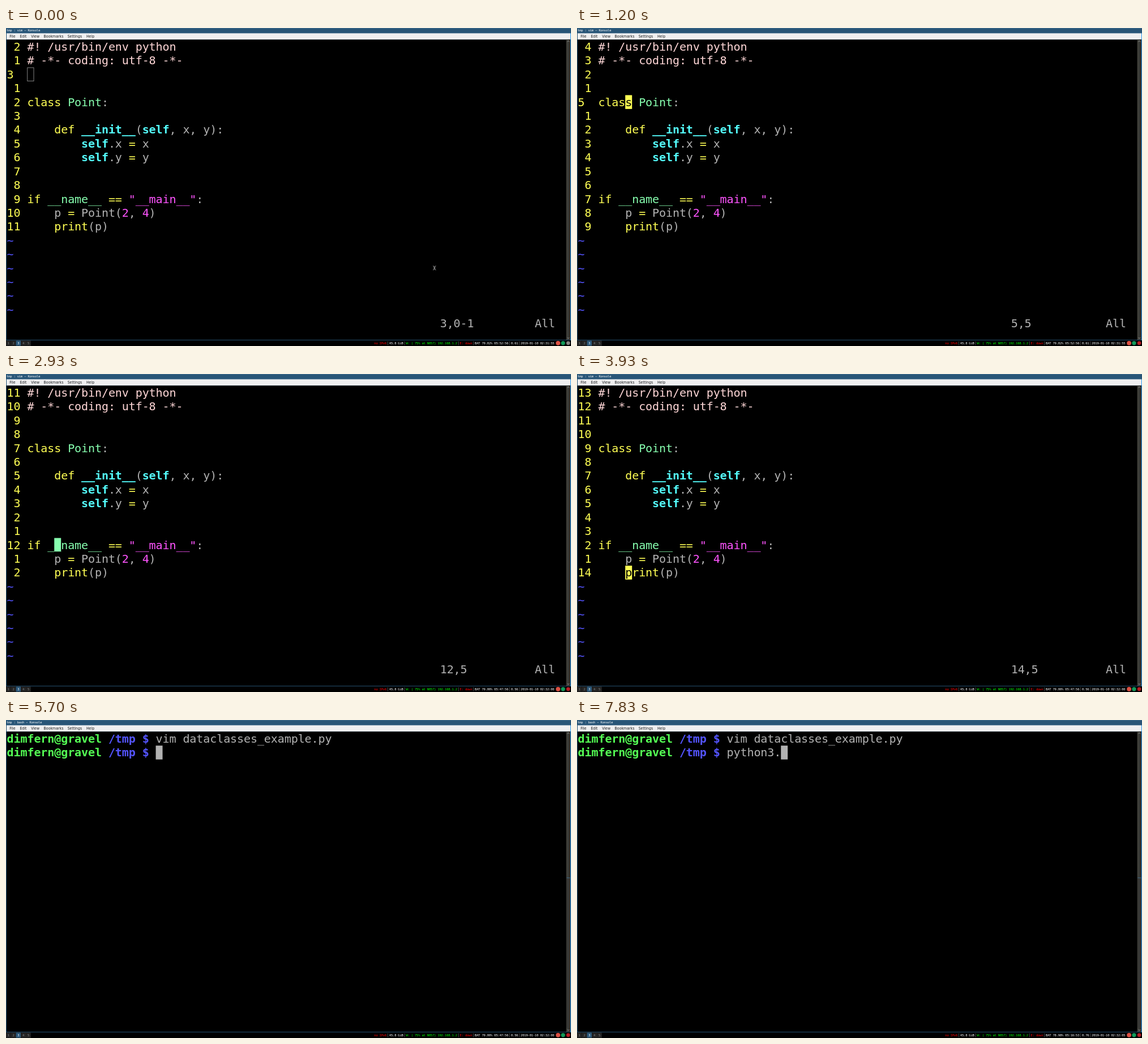
Animation of 998x561 px, one loop 8 s. Source, as an HTML page with a canvas:

```html
<!DOCTYPE html>
<html lang="en">
<head>
<meta charset="utf-8">
<title>Terminal session</title>
<style>
  html, body { margin: 0; width: 100%; height: 100%; overflow: hidden; background: #000; }
  canvas { display: block; }
</style>
</head>
<body>
<canvas id="stage" width="998" height="561"></canvas>
<script>
const ctx = document.getElementById('stage').getContext('2d');
const LOOP = 8000;

// The desktop is laid out at 1920 x 1080 and scaled down to the stage.
const DESK_W = 1920, DESK_H = 1080, BAR_Y = 1061;
const CELL_W = 23, CELL_H = 47, TERM_X = 3, TERM_Y = 40, BASELINE = 37;
const MONO = '"DejaVu Sans Mono", monospace';
const COLOR = {
  plain: '#b2b2b2', comment: '#ffd7d7', string: '#ff54ff', number: '#ff54ff',
  member: '#54ffff', type: '#87ffaf', keyword: '#ffff54', blue: '#5454ff', green: '#54ff54'
};

const SOURCE = `#! /usr/bin/env python
# -*- coding: utf-8 -*-


class Point:

    def __init__(self, x, y):
        self.x = x
        self.y = y


if __name__ == "__main__":
    p = Point(2, 4)
    print(p)`.split('\n');
const TOKENS = /(?<comment>#.*)|(?<string>"[^"]*")|(?<member>__init__|self)|(?<type>__name__|(?<=class )Point)|(?<keyword>\b(?:class|def|if|print)\b|=+)|(?<number>\d)/g;

// Per line: the token kind of every character.
const KINDS = SOURCE.map(line => {
  const kinds = Array(line.length).fill('plain');
  for (const match of line.matchAll(TOKENS)) {
    const kind = Object.keys(match.groups).find(k => match.groups[k]);
    kinds.fill(kind, match.index, match.index + match[0].length);
  }
  return kinds;
});

// Cursor in the editor: [start time, line, column]
const MOVES = [
  [0, 3, 0], [400, 4, 0], [550, 5, 0], [650, 5, 1], [750, 5, 2], [850, 5, 3], [950, 5, 4],
  [1500, 6, 4], [1750, 7, 4], [1980, 8, 4], [2230, 9, 4], [2430, 10, 4], [2630, 11, 4],
  [2830, 12, 4], [3060, 13, 4], [3270, 14, 4]
];
const STATUS = [
  [0, 'BAT 79.02% 05:52:56', '0.61', '2019-01-10 02:31:55'],
  [1550, 'BAT 79.00% 05:47:56', '0.56', '2019-01-10 02:32:00'],
  [6550, 'BAT 78.98% 05:16:53', '0.76', '2019-01-10 02:32:05']
];
const FOCUS_AT = 200, COLON_AT = 4300, Q_AT = 4500, QUIT_AT = 5370;
const TYPE_FROM = 7070, TYPE_TO = 7830, COMMAND = 'python3.';

const latest = (steps, t) => steps.findLast(step => step[0] <= t);

function rect(x, y, w, h, color) {
  ctx.fillStyle = color;
  ctx.fillRect(x, y, w, h);
}

function circle(x, y, r, color) {
  ctx.fillStyle = color;
  ctx.beginPath();
  ctx.arc(x, y, r, 0, 2 * Math.PI);
  ctx.fill();
}

function spaced(text, x, y, pitch) {
  [...text].forEach((char, i) => ctx.fillText(char, x + i * pitch, y));
}

function small(text, x, y, color) {
  ctx.font = '10.67px ' + MONO;
  ctx.fillStyle = color;
  spaced(text, x, y, 6);
}

function put(text, row, col, color = COLOR.plain, bold = false) {
  ctx.font = (bold ? 'bold ' : '') + '38.67px ' + MONO;
  ctx.fillStyle = color;
  spaced(text, TERM_X + col * CELL_W, TERM_Y + row * CELL_H + BASELINE, CELL_W);
}

function block(row, col, color = COLOR.plain, focused = true) {
  const x = TERM_X + col * CELL_W, y = TERM_Y + row * CELL_H;
  if (focused) return rect(x, y, CELL_W, CELL_H, color);
  ctx.strokeStyle = color;
  ctx.lineWidth = 1.4;
  ctx.strokeRect(x + .7, y + .7, CELL_W - 1.4, CELL_H - 1.4);
}

function drawEditor(t) {
  const [, line, col] = latest(MOVES, t);
  SOURCE.forEach((text, row) => {
    const distance = Math.abs(row + 1 - line);
    put(distance ? String(distance).padStart(2) : String(line), row, 0, COLOR.keyword);
    [...text].forEach((char, i) => {
      const kind = KINDS[row][i];
      put(char, row, i + 3, COLOR[kind], kind === 'member');
    });
  });
  for (let row = SOURCE.length; row < 20; row++) put('~', row, 0, COLOR.blue);

  const empty = !SOURCE[line - 1];
  put(`${line},${empty ? '0-1' : col + 1}`, 20, 64);
  put('All', 20, 78);

  if (t >= COLON_AT) {
    const typed = t < Q_AT ? ':' : ':q';
    put(typed, 20, 0);
    block(20, typed.length);
    return;
  }
  const at = empty ? 0 : col;
  const kind = KINDS[line - 1][at] || 'plain';
  const focused = t >= FOCUS_AT;
  block(line - 1, at + 3, COLOR[kind], focused);
  if (focused) put(SOURCE[line - 1][at] || ' ', line - 1, at + 3, '#000', kind === 'member');
}

function drawShell(t) {
  for (const row of [0, 1]) {
    put('dimfern@gravel', row, 0, COLOR.green, true);
    put('/tmp $', row, 15, COLOR.blue, true);
  }
  put('vim dataclasses_example.py', 0, 22);
  const step = (TYPE_TO - TYPE_FROM) / (COMMAND.length - 1);
  const count = t < TYPE_FROM ? 0 : Math.min(COMMAND.length, 1 + Math.floor((t - TYPE_FROM) / step + 1e-6));
  put(COMMAND.slice(0, count), 1, 22);
  block(1, 22 + count);
}

function arrow(y, dir) {
  ctx.strokeStyle = '#a0a0a0';
  ctx.lineWidth = 1.5;
  ctx.beginPath();
  ctx.moveTo(1907.5, y + 2 * dir);
  ctx.lineTo(1911, y - 2 * dir);
  ctx.lineTo(1914.5, y + 2 * dir);
  ctx.stroke();
}

function drawScrollbar(inShell) {
  const groove = ctx.createLinearGradient(1904, 0, 1918, 0);
  groove.addColorStop(0, '#45453f');
  groove.addColorStop(1, '#2c2c2a');
  rect(1904, 39, 14, BAR_Y - 41, groove);
  if (inShell) {
    rect(1905, 535, 12, 510, '#383835');
    rect(1905, 535, 12, 2, '#3f6580');
  }
  arrow(45, 1);
  arrow(1053, -1);
}

function drawWindow(inShell) {
  rect(0, 0, DESK_W, BAR_Y, '#285577');
  rect(0, 0, DESK_W, 1, '#4c7899');
  rect(0, 17, DESK_W, 1, '#4c7899');
  rect(1918, 18, 2, BAR_Y - 18, '#2e9ef4');
  rect(2, 39, 1916, BAR_Y - 41, '#000');
  small(`tmp : ${inShell ? 'bash' : 'vim'} — Konsole`, 2, 12, '#fff');

  rect(2, 18, 1916, 21, '#efeff0');
  ctx.font = '12px "DejaVu Sans", sans-serif';
  ctx.fillStyle = '#1c1e20';
  [['File', 12], ['Edit', 47], ['View', 85], ['Bookmarks', 128], ['Settings', 209], ['Help', 273]]
    .forEach(([label, x]) => ctx.fillText(label, x, 32));
  drawScrollbar(inShell);
}

function drawBar(t) {
  rect(0, BAR_Y, DESK_W, DESK_H - BAR_Y, '#000');
  for (let i = 0; i < 5; i++) {
    const active = i === 2;
    rect(i * 17, BAR_Y + 1, 16, 17, active ? '#4c7899' : '#333');
    rect(i * 17 + 1, BAR_Y + 2, 14, 15, active ? '#285577' : '#222');
    small(String(i + 1), i * 17 + 5, 1074, active ? '#fff' : '#888');
  }

  const [, battery, load, clock] = latest(STATUS, t);
  let x = 1251;
  [
    ['no IPv6', '#f00'], ['45.8 GiB', '#fff'], ['W: ( 75% at N057) 192.168.1.2', '#0f0'],
    ['E: down', '#f00'], [battery, '#fff'], [load, '#fff'], [clock, '#fff']
  ].forEach(([text, color], i) => {
    if (i) rect(x - 5, BAR_Y + 3, 1, 13, '#888');
    small(text, x, 1074, color);
    x += text.length * 6 + 9;
  });

  circle(1876, 1070, 7.5, '#dd5144');
  circle(1893, 1070, 7, '#119a5a');
  circle(1910.5, 1070, 6.5, t < FOCUS_AT ? '#858585' : '#b81c24');
}

function drawPointer(x, y) {
  ctx.strokeStyle = '#c8c8c8';
  ctx.lineWidth = 1.6;
  ctx.beginPath();
  for (const side of [-1, 1]) {
    ctx.moveTo(x + side * 5, y - 7);
    ctx.lineTo(x + side * 1.5, y - 5);
    ctx.lineTo(x + side * 1.5, y + 5);
    ctx.lineTo(x + side * 5, y + 7);
  }
  ctx.stroke();
}

function draw(now) {
  const t = now % LOOP;
  const inShell = t >= QUIT_AT;
  ctx.setTransform(998 / DESK_W, 0, 0, 561 / DESK_H, 0, 0);
  drawWindow(inShell);
  if (inShell) drawShell(t);
  else drawEditor(t);
  if (t < FOCUS_AT) drawPointer(1456, 815);
  drawBar(t);
}

const start = performance.now();
function tick() {
  draw(performance.now() - start);
  requestAnimationFrame(tick);
}
tick();
</script>
</body>
</html>
```
